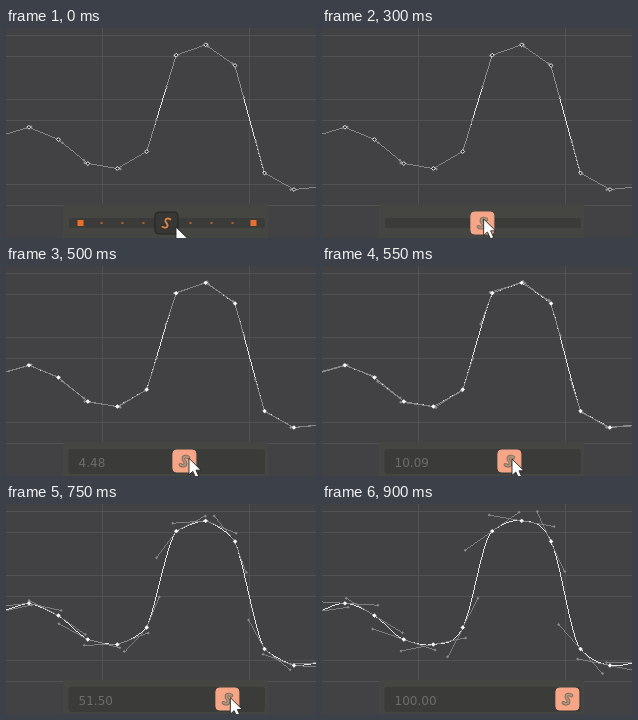
An HTML page that plays this animation: 310x210 px, repeating every 1200 ms.

```html
<!DOCTYPE html>
<html lang="en">
<head>
<meta charset="utf-8">
<title>Smoothing a curve</title>
<style>
  html, body { margin: 0; width: 100%; height: 100%; overflow: hidden; background: #424244; }
  svg { display: block; width: 100vw; height: 100vh; }
  .grid { fill: none; stroke: #525254; }
  .curve, .handles { fill: none; stroke-width: .9; shape-rendering: crispEdges; }
  .curve { stroke: #f4f4f4; }
  .handles { stroke: #868686; }
  .tips { fill: #8c8c8c; }
  .keys { fill: #282828; stroke: #fff; stroke-width: .9; }
  .keys.on { fill: #fff; stroke-width: .5; }
  .dots { fill: #b5622c; }
  .ends { fill: #e8702a; }
  .field text { font: 12px "DejaVu Sans", sans-serif; fill: #6c6c6a; }
  .btn rect { fill: #373736; stroke: #252525; }
  .btn.on rect { fill: #f6a687; stroke: #f6a687; }
  .icon { fill: none; stroke-linecap: round; stroke: #3a2a20; stroke-width: 3.6; }
  .icon.top { stroke: #c98554; stroke-width: 2; }
  .btn.on .icon { stroke: #7a6654; }
  .btn.on .icon.top { stroke: #b0967e; }
  .cursor { fill: #fff; stroke: #222; stroke-width: .9; stroke-linejoin: round; }
</style>
</head>
<body>
<svg viewBox="0 0 310 210" preserveAspectRatio="none">
  <defs>
    <path id="ess" d="M-4 3.8C-2 5.2 1 5 1.2 2.5C1.4 0-1.6-.2-1-2.8C-.6-4.8 2.600-5 4-3.500"/>
  </defs>
  <path class="grid" d="M96.5 0V210M243.5 0V210M0 7.5H310M0 28.5H310M0 71.5H310M0 92.5H310M0 156.5H310M0 177.5H310"/>
  <path class="curve" id="curve"/>
  <path class="handles" id="handles"/>
  <path class="tips" id="tips"/>
  <path class="keys" id="keys"/>
  <rect x="57" y="176" width="205.5" height="40" rx="3" fill="#454542"/>
  <rect id="track" x="63" y="190" width="196" height="10" rx="2" fill="#3b3b39"/>
  <g id="ticks">
    <path class="dots" id="dots"/>
    <path class="ends" id="ends"/>
  </g>
  <g class="field" id="field">
    <rect x="62.5" y="183" width="196.5" height="25" rx="3" fill="#3b3b39"/>
    <text id="label" x="72.600" y="200.5"></text>
  </g>
  <g class="btn" id="btn">
    <rect x="-11.5" y="-11" width="23" height="22" rx="3.5"/>
    <use class="icon" href="#ess"/>
    <use class="icon top" href="#ess"/>
  </g>
  <path class="cursor" id="cursor" d="M0 0V16.5L3.8 13L6.8 19.8L10 18.4L7 11.8H12Z"/>
</svg>
<script>
const LOOP = 1200, STEP = 50, REACH = 33, RANGE = 85, GAP = 29.45;
const PRESS = 6, DRAG = 8, LAST = 18;
const el = id => document.getElementById(id);
const set = (id, name, value) => el(id).setAttribute(name, value);
const show = (id, on) => el(id).style.display = on ? "" : "none";
const mix = (a, b, t) => a + (b - a) * t;
const diamond = (x, y, r) => `M${x} ${y - r}l${r} ${r}l${-r} ${r}l${-r} ${-r}z`;
const square = (x, r) => `M${x - r} ${195 - r}h${2 * r}v${2 * r}h${-2 * r}z`;

const heights = [108, 99.3, 111.5, 135.5, 140.5, 123.5, 27.2, 16.8, 37.5, 145, 161.5, 158.5];
const keys = heights.map((y, i) => ({ x: -6.5 + i * GAP, y }));
keys.forEach((key, i) => {
  const y = key.y;
  key.left = i ? (y - heights[i - 1]) / GAP : 0;
  key.right = i < keys.length - 1 ? (heights[i + 1] - y) / GAP : 0;
  // mean slope, held back where the curve flattens out
  const mean = (key.left + key.right) / 2;
  key.smooth = Math.sign(mean) * Math.min(Math.abs(mean), 2 * Math.abs(key.right));
});

// [step, ...values]
const slide = [[DRAG, 0], [11, 27], [13, 39], [16, 72], [LAST, RANGE]];
const pointer = [[0, 170, 199], [3, 158, 191], [5, 158, 191], [DRAG, 169, 191],
  [11, 190, 193], [13, 203, 193], [16, 235, 194], [LAST, 248, 194]];

function at(stops, step) {
  const next = stops.findIndex(s => s[0] > step);
  if (next < 0) return stops[stops.length - 1].slice(1);
  if (next === 0) return stops[0].slice(1);
  const a = stops[next - 1], b = stops[next];
  const t = (step - a[0]) / (b[0] - a[0]);
  return a.slice(1).map((value, i) => mix(value, b[i + 1], t));
}

// Unit direction that turns from the straight segment to the smooth tangent
function direction(line, smooth, v) {
  const a = Math.hypot(1, line), b = Math.hypot(1, smooth);
  const dx = mix(1 / a, 1 / b, v), dy = mix(line / a, smooth / b, v);
  const length = Math.hypot(dx, dy);
  return [dx / length, dy / length];
}

function drawCurve(v) {
  let path = "", lines = "", tips = "", third = 0;
  keys.forEach(({ x, y, left, right, smooth }, i) => {
    const [lx, ly] = direction(left, smooth, v);
    const [rx, ry] = direction(right, smooth, v);
    const third = GAP / 3;
    path += i ? ` ${x - third} ${y - third * ly / lx} ${x} ${y}` : `M${x} ${y}`;
    if (i < keys.length - 1) path += `C${x + third} ${y + third * ry / rx}`;
    for (const [hx, hy] of [[x - lx * REACH, y - ly * REACH], [x + rx * REACH, y + ry * REACH]]) {
      lines += `M${x} ${y}L${hx} ${hy}`;
      tips += diamond(hx, hy, 1.5);
    }
  });
  set("curve", "d", path);
  set("handles", "d", lines);
  set("tips", "d", tips);
}

function draw(step) {
  const px = Math.round(at(slide, step)[0]);
  const v = (px / RANGE) ** 2;
  const sliding = step > DRAG;
  drawCurve(v);
  el("keys").classList.toggle("on", sliding);
  el("btn").classList.toggle("on", step >= PRESS);
  set("btn", "transform", `translate(${160.4 + px} 195)`);
  el("label").textContent = (v * 100).toFixed(2);
  show("ticks", step < PRESS);
  show("track", !sliding);
  show("field", sliding);
  show("cursor", step < LAST);
  set("cursor", "transform", `translate(${at(pointer, step)})`);
}

set("keys", "d", keys.map(({ x, y }) => diamond(x, y, 1.9)).join(""));
const offsets = [1, 2, 3].map(i => 2.5 + 21 * i);
set("dots", "d", offsets.map(d => square(161 - d, 1) + square(161 + d, 1)).join(""));
set("ends", "d", square(74.5, 3) + square(247.5, 3));

let shown = -1;
const start = performance.now();
function tick() {
  const t = Math.max(0, performance.now() - start) % LOOP;
  const step = Math.min(LAST, Math.floor(t / STEP));
  if (step !== shown) draw(shown = step);
  requestAnimationFrame(tick);
}
tick();
</script>
</body>
</html>
```
